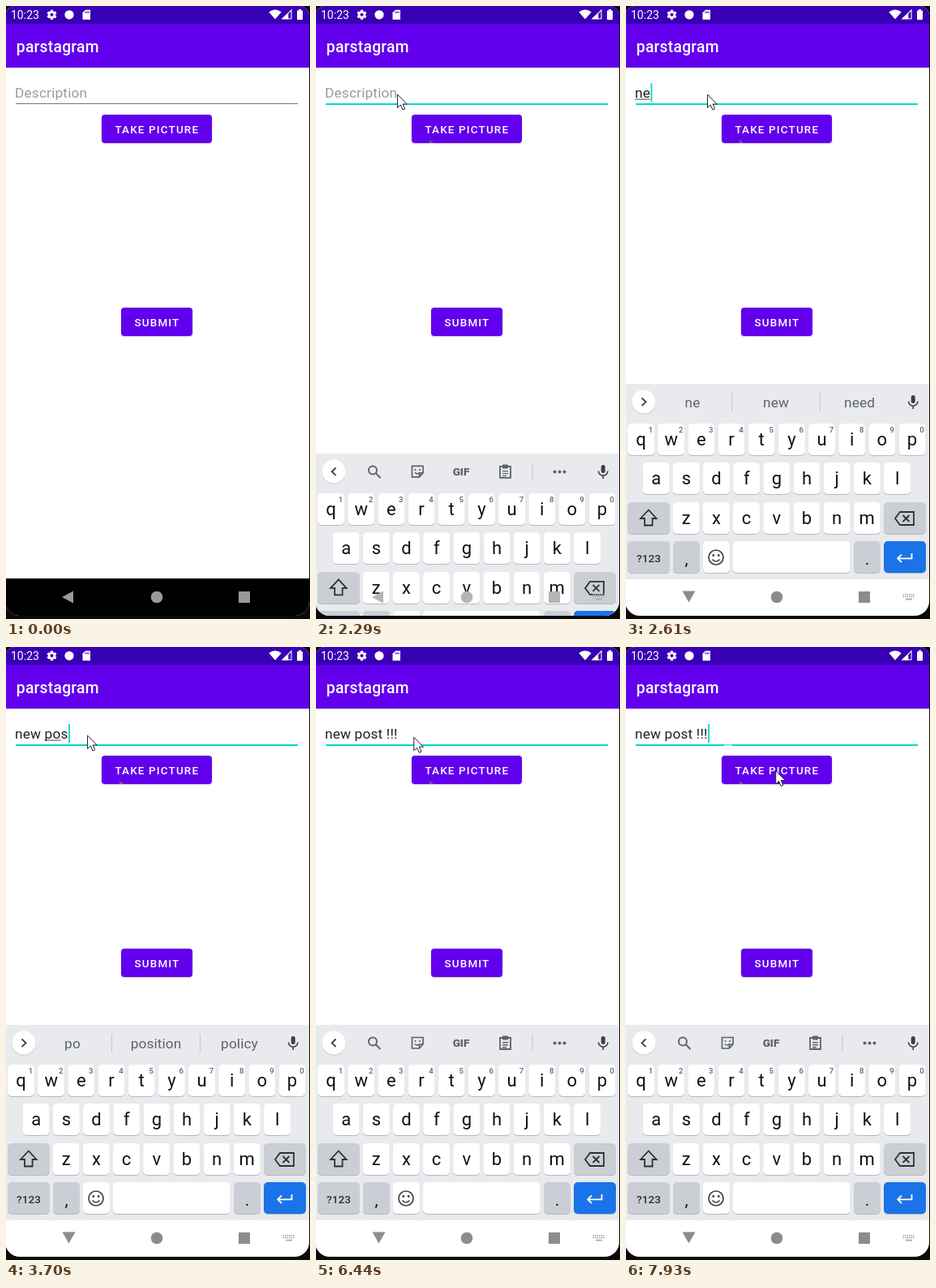
An HTML page with a canvas that plays this animation: 375 px wide and 756 px high, repeating every 8 s.

```html
<!DOCTYPE html>
<html lang="en">
<head>
<meta charset="utf-8">
<title>New post form</title>
<style>
html, body { margin: 0; width: 100%; height: 100%; overflow: hidden; background: #0b0b0b; }
canvas { display: block; width: 375px; height: 756px; }
</style>
</head>
<body>
<canvas id="stage"></canvas>
<script>
const LOOP = 8000;
const PURPLE = '#6200ee', TEAL = '#03dac5', ICON = '#5f6368', KEY_DARK = '#cbced5';
const canvas = document.getElementById('stage');
const ctx = canvas.getContext('2d');
const ratio = window.devicePixelRatio || 1;
canvas.width = 375 * ratio;
canvas.height = 756 * ratio;

// [start time, value] steps; the last one reached applies
const TYPING = [
  [0, ''], [2540, 'n'], [2610, 'ne'], [2890, 'new '], [3440, 'new p'], [3640, 'new po'],
  [3700, 'new pos'], [3970, 'new post'], [4230, 'new post '], [5290, 'new post !'],
  [5420, 'new post !!'], [5560, 'new post !!!']
];
const COMPOSING = [
  [0, null], [2540, ['', 'n']], [2610, ['', 'ne']], [2890, ['', 'new']], [3100, null],
  [3440, ['new ', 'p']], [3700, ['new ', 'po']], [3970, ['new ', 'post']], [4370, null]
];
const SUGGESTIONS = [
  [0, null], [2610, 'ne new need'], [3240, 'one year post'], [3640, 'p post people'],
  [3700, 'po position policy'], [4040, 'post posts posted'], [4570, 'and to from'],
  [5290, 'The For On'], [5630, null]
];
const CARET = [
  [0, false], [1480, true], [1940, false], [2480, true], [4830, false], [5290, true],
  [6160, false], [6660, true], [7180, false], [7640, true]
];
const at = (steps, t) => steps.reduce((value, step) => t >= step[0] ? step[1] : value, null);
const clamp = v => Math.max(0, Math.min(1, v));
const mix = (a, b, p) => a + (b - a) * p;

function rect(x, y, w, h, color, r = 0) {
  ctx.fillStyle = color;
  ctx.beginPath();
  ctx.roundRect(x, y, w, h, r);
  ctx.fill();
}

function disc(x, y, r, color) {
  ctx.fillStyle = color;
  ctx.beginPath();
  ctx.arc(x, y, r, 0, Math.PI * 2);
  ctx.fill();
}

function poly(color, ...points) {
  ctx.fillStyle = color;
  ctx.beginPath();
  for (let i = 0; i < points.length; i += 2) ctx.lineTo(points[i], points[i + 1]);
  ctx.closePath();
  ctx.fill();
}

function stroke(d, color, width = 1.7, x = 0, y = 0) {
  ctx.save();
  ctx.translate(x, y);
  ctx.strokeStyle = color;
  ctx.lineWidth = width;
  ctx.stroke(new Path2D(d));
  ctx.restore();
}

function text(str, x, y, size, color, { weight = 400, align = 'left', spacing = 0 } = {}) {
  ctx.font = `${weight} ${size}px Roboto, sans-serif`;
  ctx.letterSpacing = spacing + 'px';
  ctx.textAlign = align;
  ctx.fillStyle = color;
  ctx.fillText(str, x, y);
}

function inputWidth(str) {
  ctx.font = '400 17.3px Roboto, sans-serif';
  ctx.letterSpacing = '0.16px';
  return ctx.measureText(str).width;
}

function statusBar() {
  rect(0, 0, 375, 22, '#3700b3');
  text('10:23', 6, 16, 14, '#fff');
  for (let i = 0; i < 3; i++) {
    ctx.save();
    ctx.translate(56.5, 10.8);
    ctx.rotate(Math.PI / 3 * i);
    rect(-1.7, -6, 3.4, 12, '#fff', 0.6);
    ctx.restore();
  }
  disc(56.5, 10.8, 4.5, '#fff');
  disc(56.5, 10.8, 2, '#3700b3');
  disc(78, 10.8, 5.6, '#fff');
  poly('#fff', 98, 4.8, 104, 4.8, 104, 16.8, 94.5, 16.8, 94.5, 8.3);
  for (let i = 0; i < 3; i++) rect(97.6 + i * 2, 6.5, 1, 2.6, '#3700b3');

  ctx.fillStyle = '#fff';
  ctx.beginPath();
  ctx.moveTo(332, 16.3);
  ctx.lineTo(324.3, 7.4);
  ctx.quadraticCurveTo(332, 1.8, 339.7, 7.4);
  ctx.fill();
  stroke('M341 15.7L352 5V15.7Z', '#fff', 1.1);
  poly('#fff', 340.4, 16.2, 348.3, 8.5, 348.3, 16.2);
  rect(359, 5.5, 7, 11.5, '#fff', 1);
  rect(361, 4, 3, 2, '#fff');
}

function button(x, y, w, label) {
  ctx.save();
  ctx.shadowColor = 'rgba(0,0,0,.25)';
  ctx.shadowBlur = 2;
  ctx.shadowOffsetY = 0.7;
  rect(x, y, w, 35, PURPLE, 4);
  ctx.restore();
  text(label, x + 16.5, y + 23, 13.4, '#fff', { weight: 500, spacing: 1.2 });
}

function form(t) {
  rect(0, 22, 375, 54, PURPLE);
  text('parstagram', 12.8, 57, 19.3, '#fff', { weight: 500, spacing: 0.24 });

  const value = at(TYPING, t);
  text(value || 'Description', 11, 113, 17.3, value ? '#202020' : '#9b9b9b', { spacing: 0.16 });
  const composing = at(COMPOSING, t);
  if (composing) rect(11 + inputWidth(composing[0]), 114.5, inputWidth(composing[1]), 1, '#444');

  rect(12, 120, 348, 1, '#757575');
  const focus = clamp((t - 1070) / 280);
  if (focus) {
    ctx.globalAlpha = focus;
    rect(12, 120, 348, 2, TEAL);
    ctx.globalAlpha = 1;
  }
  if (t >= 6510) rect(121, 120.5, 10, 1.5, '#b9ece6');
  if (at(CARET, t)) rect(11.5 + inputWidth(value), 95, 1.8, 23, TEAL);

  button(118, 134, 136, 'TAKE PICTURE');
  button(142, 372, 88, 'SUBMIT');
  if (t >= 1020) poly('#75559f', 140, 165, 145, 169, 140, 169);
}

function key(x, y, w, color = '#fff') {
  rect(x, y + 1, w, 39, '#b6b9bf', 5);
  rect(x, y, w, 39, color, 5);
}

function letters(chars, firstX, y) {
  [...chars].forEach((ch, i) => {
    const x = firstX + i * 37.17;
    key(x - 16.5, y, 33);
    text(ch, x, y + 27, 22, '#111', { align: 'center' });
  });
}

function microphone() {
  rect(351.7, 480, 5, 10, '#3c4043', 2.5);
  stroke('M348.5 487.5a5.7 5.7 0 0 0 11.4 0M354.2 493V497', '#3c4043', 1.6);
}

function toolIcons() {
  stroke('M5 0A5 5 0 1 1-5 0A5 5 0 1 1 5 0M3.7 3.7L9.5 9.5', ICON, 2, 70, 486.5);
  stroke('M118.5 481.5H132V490L127.5 495H118.5ZM132 490H127.5V495M122 489.5q3 3 5.5 0', ICON, 1.7);
  disc(122.5, 486, 1.1, ICON);
  disc(128, 486, 1.1, ICON);
  text('GIF', 179, 493, 13.5, ICON, { weight: 900, align: 'center' });
  stroke('M227 482H240V496H227Z', ICON, 1.8);
  rect(230, 479.5, 7, 5, ICON, 1);
  for (const y of [487, 490, 493]) rect(230, y, y === 493 ? 5 : 7, 1.4, ICON);
  rect(266.5, 478, 1, 21, '#c4c7cc');
  for (const x of [294.5, 300.5, 306.5]) disc(x, 488.5, 2, ICON);
}

function keyboard(t) {
  rect(0, 466, 375, 241, '#e8eaed');
  disc(22, 489, 14.8, '#d0d2d6');
  disc(22, 488, 14.5, '#fff');
  const words = at(SUGGESTIONS, t);
  if (words) {
    stroke('M19.5 483.5L24.5 488.3L19.5 493', '#3c4043', 1.8);
    words.split(' ').forEach((word, i) =>
      text(word, 82 + i * 103, 495, 17.3, ICON, { align: 'center', spacing: 0.1 }));
    rect(130, 477.5, 1, 22.5, '#c4c7cc');
    rect(239, 477.5, 1, 22.5, '#c4c7cc');
  } else {
    stroke('M24.5 483.5L19.5 488.3L24.5 493', '#3c4043', 1.8);
    toolIcons();
  }
  microphone();

  letters('qwertyuiop', 18.5, 515);
  for (let i = 0; i < 10; i++) {
    text((i + 1) % 10, 30.5 + i * 37.17, 526, 9.6, ICON, { weight: 500, align: 'center' });
  }
  letters('asdfghjkl', 37.2, 563);
  letters('zxcvbnm', 74.2, 612);

  key(2, 612, 52, KEY_DARK);
  stroke('M27.8 621.5L18 632H23V640.5H32.6V632H37.6Z', '#303134', 1.8);
  key(318, 612, 52, KEY_DARK);
  stroke('M338 624H355V640H338L332 632ZM341.5 628L349.5 636M349.5 628L341.5 636', '#303134', 1.8);

  key(2, 660, 52, KEY_DARK);
  text('?123', 28, 685.5, 13.6, '#303134', { weight: 500, align: 'center' });
  key(58, 660, 33, KEY_DARK);
  text(',', 74.5, 689, 21, '#111', { align: 'center' });
  key(95, 660, 33);
  stroke('M120 680A9 9 0 1 1 102 680A9 9 0 1 1 120 680M106.5 682.5q4.5 5 9 0', '#3c4043', 1.7);
  disc(107.8, 677.5, 1.4, '#3c4043');
  disc(114.2, 677.5, 1.4, '#3c4043');
  key(132, 660, 144.5);
  key(281, 660, 33, KEY_DARK);
  text('.', 297.5, 689, 21, '#111', { align: 'center' });
  key(318, 660, 52, '#1a73e8');
  stroke('M352.5 675V681.3H335.5M340 676.5L335.2 681.3L340 686', '#fff', 1.8);
}

function navIcons(t) {
  const color = t < 2290 ? '#999' : t < 2470 ? '#b5b5b5' : '#8c8c8c';
  if (t < 2410) poly(color, 69, 729, 83, 721.5, 83, 736.5);
  else poly(color, 69.5, 721.5, 85.5, 721.5, 77.5, 735.5);
  disc(186, 729, 7.3, color);
  rect(287, 722, 14, 14, color);
  if (t < 1940) return;
  const dots = t < 2290 ? '#777' : '#aaa';
  for (let row = 0; row < 2; row++) {
    for (let i = 0; i < 6; i++) rect(341.5 + i * 2.5, 725 + row * 2.6, 1.6, 1.6, dots);
  }
  rect(345, 730.8, 8, 1.7, dots);
}

function pointerPosition(t) {
  if (t < 320) return null;
  if (t < 6440) {
    const p = clamp(Math.floor((t - 320) / 70 + 0.3) / 11);
    const e = p * (2 - p);
    const bend = 2 * e * (1 - e);
    return [
      (1 - e) ** 2 * 350 + bend * 190 + e * e * 100.5,
      (1 - e) ** 2 * 701 + bend * 260 + e * e * 109
    ];
  }
  if (t < 7180) {
    const p = clamp((Math.floor((t - 6440) / 67) + 1) / 8);
    return [mix(100.5, 187, p * (2 - p)), mix(109, 160, p ** 1.5)];
  }
  if (t < 7310) return [187, 158];
  const p = clamp(Math.floor((t - 7310) / 70) / 8);
  return [mix(186.7, 184.7, p), mix(156, 152.5, p)];
}

function pointer(t) {
  const position = pointerPosition(t);
  if (!position) return;
  ctx.save();
  ctx.translate(...position);
  const arrow = new Path2D('M0 0V16.5L3.8 13L6.5 19L9.2 17.8L6.6 12H11.7Z');
  ctx.fillStyle = '#fff';
  ctx.fill(arrow);
  ctx.strokeStyle = '#222';
  ctx.lineWidth = 1;
  ctx.stroke(arrow);
  ctx.restore();
}

function keyboardOffset(t) {
  const moment = [2290, 2360, 2410, 2470].filter(m => m <= t).pop();
  return 290 * (1 - clamp((moment - 2200) / 270)) ** 3;
}

function draw(t) {
  ctx.setTransform(ratio, 0, 0, ratio, 0, 0);
  rect(0, 0, 375, 756, '#0b0b0b');
  ctx.save();
  ctx.beginPath();
  ctx.roundRect(-1, 0, 375, 752, [12, 12, 18, 18]);
  ctx.clip();
  rect(0, 0, 375, 756, '#fff');
  form(t);
  statusBar();
  if (t < 2290) {
    rect(0, 706, 375, 50, '#000');
  } else {
    ctx.save();
    ctx.translate(0, keyboardOffset(t));
    keyboard(t);
    ctx.restore();
  }
  navIcons(t);
  ctx.restore();
  pointer(t);
}

const start = performance.now();
function tick() {
  draw((performance.now() - start) % LOOP);
  requestAnimationFrame(tick);
}
tick();
</script>
</body>
</html>
```
